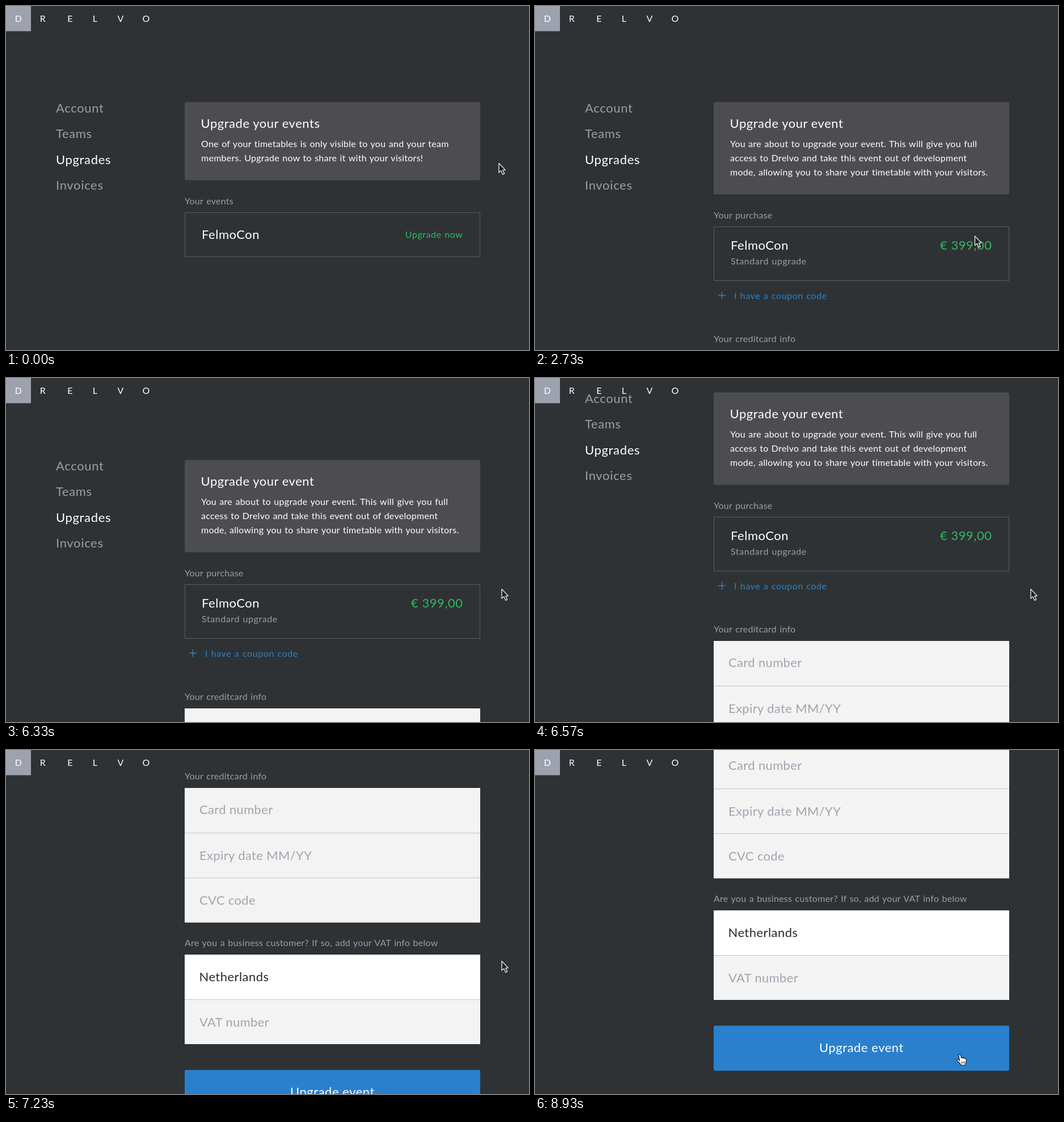
Write an HTML page that moves like this. It is 922 by 607 pixels and loops after 9770 ms.

```html
<!DOCTYPE html>
<html lang="en">
<head>
<meta charset="utf-8">
<title>Upgrade flow</title>
<style>
  html, body { margin: 0; width: 100%; height: 100%; overflow: hidden; background: #2e3234; }
  svg { display: block; width: 100vw; height: 100vh; }
  text {
    font-family: Lato, "Open Sans", sans-serif;
    font-size: 16px;
    letter-spacing: .017em;
    word-spacing: .06em;
    fill: #fff;
    white-space: pre;
  }
  .big { font-size: 22px; letter-spacing: .024em; word-spacing: 0; }
  .menu { letter-spacing: .03em; }
  .loose { letter-spacing: .036em; }
  .muted { fill: #9b9ea8; }
  .hint { fill: #a3a3b0; letter-spacing: .016em; }
  .dark { fill: #26292b; letter-spacing: .02em; }
  .green { fill: #34b866; }
  .green.hover { fill: #4bd07f; }
  .blue { fill: #2f82c6; }
  .end { text-anchor: end; }
  .mid { text-anchor: middle; }
</style>
</head>
<body>
<svg id="stage" viewBox="0 0 922 607"></svg>
<script>
const LOOP = 9770;
const CHECKOUT_AT = 2730;
const stage = document.getElementById("stage");

function add(parent, tag, attrs = {}, content) {
  const node = document.createElementNS("http://www.w3.org/2000/svg", tag);
  for (const key in attrs) node.setAttribute(key, attrs[key]);
  if (content !== undefined) node.textContent = content;
  parent.appendChild(node);
  return node;
}

const group = parent => add(parent, "g");
const label = (parent, x, y, content, style = "") =>
  add(parent, "text", { x, y, class: style }, content);
const box = (parent, y, height, fill, rx = 0) =>
  add(parent, "rect", { x: 315, y, width: 521, height, fill, rx });
const outline = (parent, y, height) =>
  add(parent, "rect", { x: 315.5, y, width: 520, height, fill: "none", stroke: "#585b61" });
const divider = (parent, y) =>
  add(parent, "path", { d: `M315 ${y}h521`, stroke: "#c3c3c9" });

function notice(parent, height, title, lines) {
  box(parent, 169.5, height, "#4d4d51", 3);
  label(parent, 343.5, 215, title, "big");
  lines.forEach((line, i) => label(parent, 344, 249 + 25 * i, line));
}

const page = group(stage);
["Account", "Teams", "Upgrades", "Invoices"].forEach((item, i) =>
  label(page, 88, 188 + 45.3 * i, item, item === "Upgrades" ? "big menu" : "big menu muted"));

// Overview
const overview = group(page);
notice(overview, 138, "Upgrade your events", [
  "One of your timetables is only visible to you and your team",
  "members. Upgrade now to share it with your visitors!"
]);
label(overview, 315, 350, "Your events", "muted");
outline(overview, 364.5, 78);
label(overview, 345, 411, "FelmoCon", "big");
const link = label(overview, 805.5, 409, "Upgrade now", "green loose end");

// Checkout
const checkout = group(page);
notice(checkout, 163, "Upgrade your event", [
  "You are about to upgrade your event. This will give you full",
  "access to Drelvo and take this event out of development",
  "mode, allowing you to share your timetable with your visitors."
]);
label(checkout, 315, 375, "Your purchase", "muted");
outline(checkout, 389.5, 95);
label(checkout, 345, 430, "FelmoCon", "big");
label(checkout, 345, 456, "Standard upgrade", "muted loose");
label(checkout, 805.5, 430, "€ 399,00", "big green end");
add(checkout, "path", { d: "M323 510.5h13m-6.5-6.5v13", stroke: "#2f82c6", "stroke-width": 1.5 });
label(checkout, 351, 517, "I have a coupon code", "blue loose");

label(checkout, 315, 593, "Your creditcard info", "muted");
box(checkout, 608, 237.5, "#f3f3f3");
divider(checkout, 687.5);
divider(checkout, 766.5);
label(checkout, 341, 654, "Card number", "big hint");
label(checkout, 341, 735, "Expiry date MM/YY", "big hint");
label(checkout, 341, 814, "CVC code", "big hint");

label(checkout, 315, 887, "Are you a business customer? If so, add your VAT info below", "muted");
box(checkout, 902, 79, "#fff");
box(checkout, 981, 79, "#f3f3f3");
divider(checkout, 981.5);
label(checkout, 340.5, 948.5, "Netherlands", "big dark");
label(checkout, 341, 1029, "VAT number", "big hint");
box(checkout, 1105.5, 79.5, "#2a80cd", 3);
label(checkout, 575.5, 1152, "Upgrade event", "big mid");

// Fixed header
add(stage, "rect", { width: 44, height: 44.5, fill: "#9ea2ae" });
[22, 65, 113, 157, 202, 247].forEach((x, i) => label(stage, x, 28, "DRELVO"[i], "mid"));

// Pointers, with the hotspot at the origin
const arrow = group(stage);
add(arrow, "path", {
  d: "M0 0V16.6L3.8 13.2 6.7 19.8 9.6 18.5 6.8 12.1H11.3Z",
  fill: "#1f2123", stroke: "#dedede", "stroke-width": 1.4, "stroke-linejoin": "round"
});
const hand = group(stage);
add(hand, "path", {
  d: "M-2.5 1.8C-2.8-.6 .3-1 1 1.4L2.2 6C3 4.6 5 5 5.2 6.4C6 5.3 8 5.8 8.2 7.2" +
     "C9.2 6.5 10.8 7.2 10.8 9C11.2 12.5 9.8 14 9.4 18.5H1.2C.8 15.8-2.8 13.4-5.3 10.6" +
     "C-6.6 8.8-4.6 7.4-3 8.8L-1 10.6Z",
  fill: "#fff", stroke: "#1c1e20", "stroke-width": 1.2, "stroke-linejoin": "round"
});
add(hand, "path", { d: "M3 12v4M5.4 12v4M7.8 12v4", stroke: "#1c1e20", "stroke-width": .9 });

// Each move: start, end, from, bend point, to
const moves = [
  [90, 970, [869, 277.5], [835, 355], [775.5, 406]],
  [4720, 5370, [775.5, 406], [825, 398], [874, 372.5]],
  [8420, 8930, [874, 372.5], [865, 500], [749.5, 537.5]]
];

// Scroll keys: time, offset, speed per ms
const scrollKeys = [
  [6140, 0, 0], [6330, 25, .35], [6800, 287, .62], [7230, 541, .33], [7800, 619, 0]
];

const clamp = v => Math.min(1, Math.max(0, v));
const ease = u => u * u * (3 - 2 * u);

function pointer(t) {
  const [start, end, a, b, c] = moves.filter(m => t >= m[0]).pop() || moves[0];
  const u = ease(clamp((t - start) / (end - start)));
  return a.map((v, i) => (1 - u) ** 2 * v + 2 * u * (1 - u) * b[i] + u * u * c[i]);
}

function scrollAt(t) {
  const next = scrollKeys.findIndex(k => k[0] > t);
  if (next === 0) return 0;
  if (next < 0) return scrollKeys[scrollKeys.length - 1][1];
  const [t0, y0, v0] = scrollKeys[next - 1];
  const [t1, y1, v1] = scrollKeys[next];
  const d = t1 - t0, u = (t - t0) / d, s = ease(u);
  return y0 + (y1 - y0) * s + d * (v0 * u * (1 - u) ** 2 - v1 * u * u * (1 - u));
}

const show = (node, on) => node.setAttribute("display", on ? "inline" : "none");
const move = (node, x, y) => node.setAttribute("transform", `translate(${x} ${y})`);

function render(t) {
  const [x, y] = pointer(t);
  const scroll = Math.round(scrollAt(t));
  const paid = t >= CHECKOUT_AT;
  const onLink = !paid && x > 704 && x < 806 && y > 391;
  const onButton = t > 8000 && x < 836 && y > 486;

  show(overview, !paid);
  show(checkout, paid);
  move(page, 0, -scroll);
  link.classList.toggle("hover", onLink);
  show(hand, onLink || onButton);
  show(arrow, !(onLink || onButton));
  move(arrow, x, y);
  move(hand, x, y);
}

const begin = performance.now();
function tick() {
  render((performance.now() - begin) % LOOP);
  requestAnimationFrame(tick);
}
render(0);
requestAnimationFrame(tick);
</script>
</body>
</html>
```
